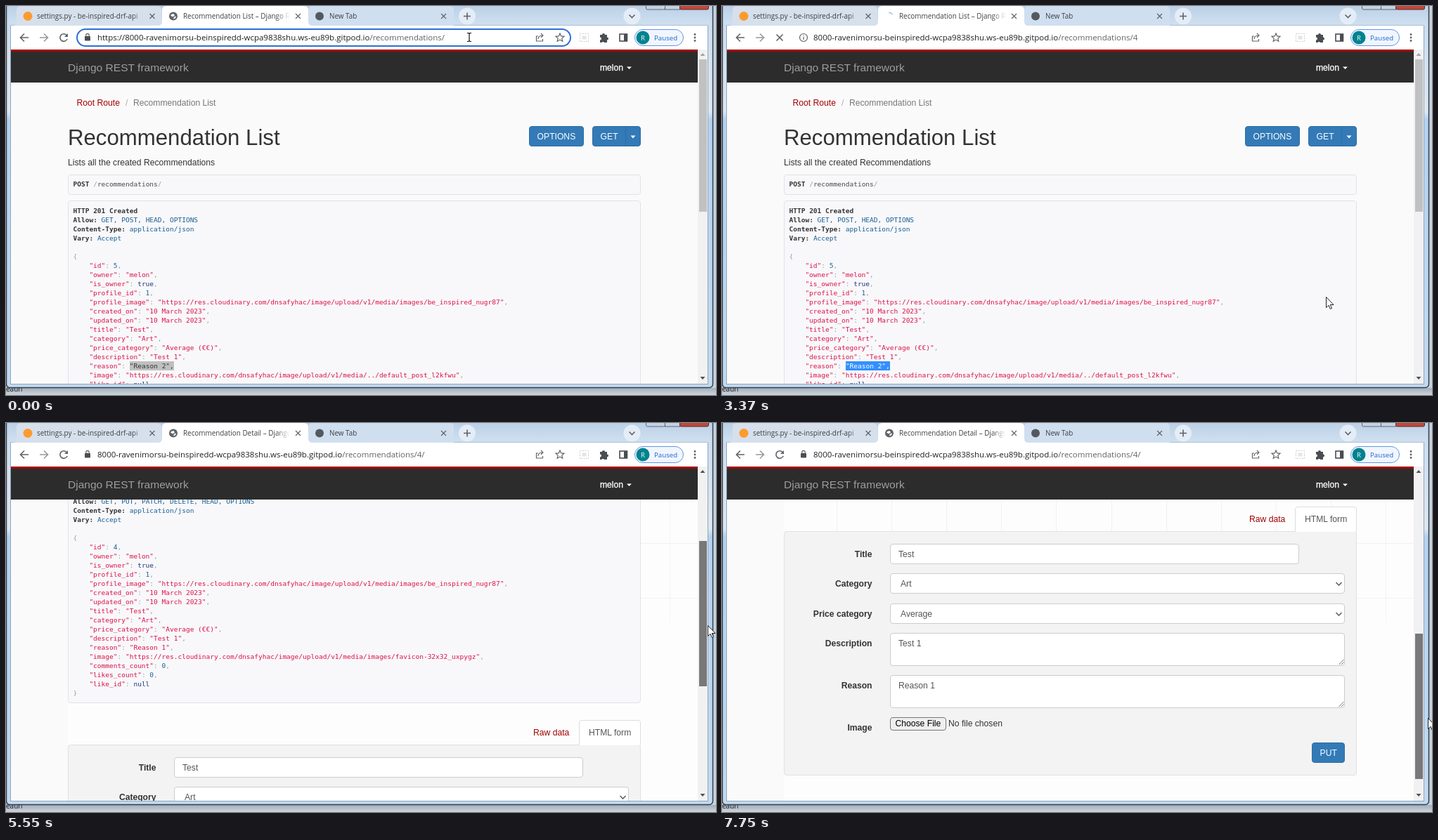
Recreate the animation shown at these times as an HTML page. Size 1010 by 554 pixels, loop 8000 ms.

```html
<!DOCTYPE html>
<html lang="en">
<head>
<meta charset="utf-8">
<style>
  html, body { margin: 0; width: 1010px; height: 554px; overflow: hidden; }
  svg { display: block; }
  text { font: 12.15px "Liberation Sans", Arial, sans-serif; fill: #333; }
  .ui { font: 11.5px "Open Sans", sans-serif; fill: #202124; }
  .tab { font-size: 9.9px; fill: #3c4043; }
  .mono { font: 9.53px "DejaVu Sans Mono", monospace; fill: #93a1a1; }
  .bold { font-weight: bold; fill: #333; }
  .str { fill: #d14; }
  .lit { fill: #195f91; }
  .kwd { fill: #1e347b; }
  .pln { fill: #48484c; }
  .red { fill: #a30000; }
  .mute { fill: #777; }
  .white { fill: #fff; }
  .h1 { font-size: 31.2px; }
  .field { fill: #fff; stroke: #ccc; }
  .value { fill: #555; }
  .icon { fill: none; stroke: #5f6368; stroke-width: 1.6; }
  .thin { stroke-width: 1.2; }
  #popup > rect:first-child { filter: drop-shadow(0 2px 3px #0005); }
</style>
</head>
<body>
<script>
const DURATION = 8000;
const HOST = '8000-ravenimorsu-beinspiredd-wcpa9838shu.ws-eu89b.gitpod.io';
const USER = 'melon';
const MEDIA = 'https://res.cloudinary.com/dnsafyhac/image/upload/v1/media/';
const LINE = 13.03;

const text = (x, y, s, cls = '', extra = '') => `<text x="${x}" y="${y}" class="${cls}" ${extra}>${s}</text>`;
const rect = (x, y, w, h, fill, extra = '') =>
  `<rect x="${x}" y="${y}" width="${w}" height="${h}" ${fill ? `fill="${fill}"` : ''} ${extra}/>`;
// Outlined box whose 1px border lies on whole pixels
const box = (x, y, w, h, fill, extra) => rect(x + .5, y + .5, w - 1, h - 1, fill, `rx="3.5" ${extra}`);
const path = (d, cls = 'icon', extra = '') => `<path d="${d}" class="${cls}" ${extra}/>`;
const circle = (x, y, r, extra) => `<circle cx="${x}" cy="${y}" r="${r}" ${extra}/>`;
const group = (id, content) => `<g id="${id}">${content}</g>`;
const span = (cls, s) => `<tspan class="${cls}">${s}</tspan>`;
const button = (x, y, w, label, fill = '#337ab7', stroke = '#2e6da4') =>
  box(x, y, w, 29, fill, `stroke="${stroke}"`) + text(x + 11.6, y + 19, label, 'white');
const panel = (y, h) => box(88, y, 815, h, '#f8f8fb', 'stroke="#e1e1e8"');

// Page content

const colorJson = s => s.replace(/("[^"]*")|(\d+)|(true|null)/g, (m, str, num) =>
  span(str ? 'str' : num ? 'lit' : 'kwd', m));

const record = (id, reason, image, rest) => [
  `"id": ${id},`, `"owner": "${USER}",`, '"is_owner": true,', '"profile_id": 1,',
  `"profile_image": "${MEDIA}images/be_inspired_nugr87",`,
  '"created_on": "10 March 2023",', '"updated_on": "10 March 2023",',
  '"title": "Test",', '"category": "Art",', '"price_category": "Average (€€)",',
  '"description": "Test 1",', `"reason": "${reason}",`, `"image": "${MEDIA}${image}",`, ...rest];

function exchange(y, height, method, url, status, allow, json) {
  const header = (name, value) => span('bold', name + ':') + ' ' + span('lit', value);
  const head = [span('bold', status), header('Allow', allow),
    header('Content-Type', 'application/json'), header('Vary', 'Accept'), '', '{'];
  const row = (i, x, s) => text(x, Math.round(y + 54.6 + i * LINE), s, 'mono');
  return panel(y, 29) + panel(y + 37, height) +
    text(95.5, y + 17, span('bold', method) + ' ' + url.replace(/\w+/g, w => span('pln', w)), 'mono') +
    head.map((s, i) => row(i, 95.5, s)).join('') +
    json.map((s, i) => row(i + 6, 118.4, colorJson(s))).join('') +
    row(json.length + 6, 95.5, '}');
}

const heading = (title, ...lines) =>
  text(100.5, 142, 'Root Route', 'red') + text(170, 142, '/', 'mute', 'opacity=".6"') +
  text(88, 198, title, 'h1') +
  lines.map((s, i) => text(88, 227 + i * 17, s)).join('') +
  button(744, 171, 78, 'OPTIONS') + button(834, 171, 69, 'GET') +
  path('M881.5 171V200', '', 'stroke="#2e6da4"') + path('M888.5 184.5h7l-3.5 4z', 'white');

const listPage = heading('Recommendation List', 'Lists all the created Recommendations') +
  text(181, 142, 'Recommendation List', 'mute') +
  exchange(240, 300, 'POST', '/recommendations/', 'HTTP 201 Created', 'GET, POST, HEAD, OPTIONS',
    record(5, 'Reason 2', '../default_post_l2kfwu', ['"like_id": null,'])) +
  rect(176, 506, 63, 13, '', 'id="mark"') +
  text(175.8, 516, '"Reason 2",', 'mono', 'id="marked"');

const label = (y, s) => text(213.5, y, s, 'bold', 'text-anchor="end"');
const field = (y, w, h, name, value, x = 251) => label(y + 19, name) +
  box(239, y, w, h, '', 'class="field"') + text(x, y + 19, value, 'value');
const select = (y, name, value) => field(y, 647, 29, name, value, 254) + path(`M873.5 ${y + 13}l4 4 4-4`);
const area = (y, name, value) => field(y, 647, 47, name, value) +
  path(`M877.5 ${y + 45}l7-7m-3.5 7l3.5-3.5`, 'icon', 'style="stroke-width:.9"');

const form = box(88, 669, 815, 348, '#f3f3f4', 'stroke="#e1e1e4"') +
  path('M815.5 670V638q0-3.5 3.5-3.5H899q3.5 0 3.5 3.5V670', '', 'fill="#fff" stroke="#ddd"') +
  text(750, 656, 'Raw data', 'red') + text(829, 656, 'HTML form', 'value') +
  field(687, 582, 29, 'Title', 'Test') +
  select(729, 'Category', 'Art') + select(772, 'Price category', 'Average') +
  area(814, 'Description', 'Test 1') + area(874, 'Reason', 'Reason 1') +
  label(953, 'Image') + box(239, 934, 80, 19, '#efefef', 'stroke="#767676"') +
  text(246.5, 947, 'Choose File', '', 'style="fill:#000"') + text(322, 947, 'No file chosen') +
  button(839, 970, 47, 'PUT');

const detailPage = heading('Recommendation Detail', 'Displays details of selected Recommendation',
    'Allows the owner to edit or delete it') +
  text(181, 142, 'Recommendation List', 'red') + text(306, 142, '/', 'mute', 'opacity=".6"') +
  text(317, 142, 'Recommendation Detail', 'mute') +
  button(663, 171, 70, 'DELETE', '#d9534f', '#d43f3a') +
  exchange(258, 315, 'GET', '/recommendations/4/', 'HTTP 200 OK', 'GET, PUT, PATCH, DELETE, HEAD, OPTIONS',
    record(4, 'Reason 1', 'images/favicon-32x32_uxpygz', ['"comments_count": 0,', '"likes_count": 0,', '"like_id": null'])) +
  form;

let gridLines = 'M88 171.5H984M88 249.5H984';
for (let i = 0; i < 11; i++) gridLines += `M${Math.round(163 + 78.1 * i) + .5} 109V284`;
const grid = rect(88, 109, 896, 429, '#fdfdfd') + path(gridLines, '', 'stroke="#f2f2f2" fill="none"') +
  rect(88, 122, 815, 31, '#f4f4f4', 'id="crumbBar"');

// Browser window

const closeMark = x => path(`M${x - 3.5} 11l7 7m0-7l-7 7`, 'icon thin');
const globe = (x, y) => circle(x, y, 6, 'fill="#5f6368"') +
  path(`M${x - 4} ${y - 1}q2-3 5-2l1 2-3 2zm5 2l3-1-1 3-3 1z`, 'white');

const frame = rect(0, 0, 1010, 554, '#c6d2de') + rect(0, 544, 1010, 10, 'url(#shade)') +
  text(0, 549, 'eaun', 'ui', 'style="font-size:10px"') +
  rect(.5, -10, 1005, 553.5, 'url(#glass)', 'rx="5" stroke="#34404e" stroke-width="1.5"') +
  rect(6.5, 28, 992, 510.5, '#fafafa', 'stroke="#8ea6bd"') +
  rect(910.5, -6, 27, 11, '#c3d3e4', 'rx="2" stroke="#5a6878"') + rect(937.5, -6, 21, 11, '#c3d3e4', 'stroke="#5a6878"') +
  rect(958.5, -6, 41, 11, '#c0483a', 'rx="2" stroke="#5a2f2c"');

const tabs = path('M10 28q5 0 5-6V6q0-6 6-6H215q6 0 6 6V28z', '', 'fill="#d6e0ec"') +
  path('M430 28V6q0-6 6-6H631q6 0 6 6V28z', '', 'fill="#d0dff0"') +
  path('M216 28q6 0 6-6V6q0-6 6-6H424q6 0 6 6V22q0 6 6 6z', 'white') +
  circle(31, 14.5, 6.5, 'fill="#ff9a2e"') + circle(446, 14.5, 6, 'fill="#55595e"') +
  text(44, 18, 'settings.py - be-inspired-drf-api', 'ui tab') +
  text(252, 18, '', 'ui tab', 'id="title"') + text(460, 18, 'New Tab', 'ui tab') +
  rect(180, 5, 22, 20, 'url(#fadeTab)') + rect(385, 5, 21, 20, 'url(#fadeActive)') + rect(405, 5, 5, 20, '#fff') +
  [208, 415.5, 622.5].map(closeMark).join('') +
  group('favicon', globe(238, 14.5)) +
  circle(238, 14.5, 5, 'id="spinner" fill="none" stroke="#a9c3e8" stroke-width="1.6" stroke-dasharray="6 26"') +
  circle(656, 14.5, 12, 'fill="#e4edf7"') + path('M651 14.5h10m-5-5v10') +
  circle(890.5, 14.5, 12, 'fill="#e4edf7"') + path('M886.5 12.5l4 4 4-4');

const toolbar = rect(7, 28, 991, 34, '#fff') +
  path('M32 45H21m5-5.5l-5.5 5.5 5.5 5.5') + path('M48 45h11m-5-5.5l5.5 5.5-5.5 5.5', 'icon', 'opacity=".65"') +
  group('reload', path('M86.5 42a5.3 5.3 0 1 0 .6 5') + path('M88 39v5h-5z', '', 'fill="#5f6368"')) +
  group('stop', path('M77.5 40.5l9 9m0-9l-9 9')) +
  rect(101, 33, 702, 24, '#fff', 'id="focus" rx="12" stroke="#2c6fd6" stroke-width="2"') +
  path('M757 43h-2.5v7h9v-3M757 47q.5-5 6-5m-2-3l3 3-3 3', 'icon thin') +
  path('M788 39l1.7 3.9 4.3.4-3.2 2.8 1 4.2-3.8-2.2-3.8 2.2 1-4.2-3.2-2.8 4.3-.4z', 'icon thin') +
  rect(816.5, 39.5, 12, 11, 'none', 'stroke="#ccc" stroke-dasharray="2 1.5"') + rect(819.5, 42.5, 6, 5, '#e4e4e4') +
  path('M845 41h3a2 2 0 1 1 4 0h3v3.5a2 2 0 1 1 0 4V52h-4a2 2 0 0 0-3.5 0H845v-3.5a2 2 0 0 0 0-4z', '', 'fill="#4a4d51"') +
  rect(873, 40, 10.5, 10, 'none', 'stroke="#4a4d51" stroke-width="1.6"') + rect(879, 40, 4.5, 10, '#4a4d51') +
  rect(894.5, 33.5, 69, 23, '#f1f6fe', 'rx="11.5" stroke="#5f96e8"') +
  circle(906, 45, 9.5, 'fill="#00838f"') + text(906, 48.5, 'R', 'ui', 'text-anchor="middle" style="font-size:9.5px;fill:#fff"') +
  text(922, 48.5, 'Paused', 'ui', 'style="font-size:9.7px;fill:#1a67d2"') +
  [40.5, 45, 49.5].map(y => circle(980, y, 1.4, 'fill="#5f6368"')).join('');

const navbar = rect(7, 62, 977, 3, '#a30000') + rect(7, 65, 977, 44, '#2c2c2c') +
  text(88, 93, 'Django REST framework', '', 'style="font-size:15.55px;fill:#9d9d9d"') +
  text(845, 92, USER, 'white', 'stroke="#fff" stroke-width=".3"') + path('M883 86.5h7l-3.5 3.5z', 'white');

const scrollbar = rect(984, 62, 14, 476, '#f1f1f1') + rect(986, 76, 11, 217, '', 'id="thumb"') +
  path('M987.5 71h7l-3.5-4z', '', 'id="up"') + path('M987.5 528h7l-3.5 4z', '', 'fill="#505050"');

const popup = rect(92, 29, 720, 112, '#fff', 'rx="13"') + rect(92, 66, 720, 34, '#e8eaed') +
  globe(122, 83) + text(138, 87, `https://${HOST}/recommendations/4`, 'ui') +
  circle(121, 116, 4, 'class="icon"') + path('M124 119l4 4') +
  text(138, 121, `https://${HOST}/recommendations/`, 'ui') + globe(122, 45);

const address = group('lock', rect(112, 43, 8, 6.5, '#4a4d51', 'rx="1"') + path('M113.8 43v-1.5a2.2 2.2 0 0 1 4.4 0V43', 'icon thin')) +
  group('info', circle(116, 45, 5.5, 'class="icon thin"') + path('M116 44v4m0-6.5v1.2', 'icon thin')) +
  text(130, 49, '', 'ui', 'id="url"') + rect(625, 36, 1, 16, '#000', 'id="caret"');

document.body.innerHTML = `<svg width="1010" height="554">
  <defs>
    <linearGradient id="glass" x2="0" y2="1">
      <stop stop-color="#b4cae3"/><stop offset=".06" stop-color="#cddeef"/>
      <stop offset=".29" stop-color="#dfe7f0"/><stop offset=".31" stop-color="#b4d2f0"/><stop offset="1" stop-color="#c3daf0"/>
    </linearGradient>
    <linearGradient id="shade" x2="0" y2="1"><stop stop-color="#a3aeb9"/><stop offset="1" stop-color="#cdd6df"/></linearGradient>
    <linearGradient id="fadeTab"><stop stop-color="#d6e0ec" stop-opacity="0"/><stop offset=".8" stop-color="#d6e0ec"/></linearGradient>
    <linearGradient id="fadeActive"><stop stop-color="#fff" stop-opacity="0"/><stop offset=".9" stop-color="#fff"/></linearGradient>
    <clipPath id="refreshed"><rect id="refreshedBox" y="109"/></clipPath>
  </defs>
  ${frame}${tabs}${toolbar}
  <svg x="7" y="109" width="977" height="429" viewBox="7 109 977 429">
    <g id="grid" clip-path="url(#refreshed)">${grid}</g>
    ${group('list', listPage)}${group('detail', detailPage)}
  </svg>
  ${navbar}${scrollbar}${group('popup', popup)}${address}
  ${path('M0 0V15L3.5 11.8 5.8 17 8 16 5.7 11H10.5Z', '', 'id="arrow" fill="#fff" stroke="#222"')}
  ${path('M656 38.5h2l1 1 1-1h2M659 39.5V49.5M656 50.5h2l1-1 1 1h2', 'icon thin', 'id="beam" style="stroke:#111"')}
</svg>`;

// Animation

const $ = id => document.getElementById(id);
const show = (id, on) => $(id).setAttribute('display', on ? 'inline' : 'none');
const set = (id, attrs) => Object.entries(attrs).forEach(([k, v]) => $(id).setAttribute(k, v));

// Pointer moves: start, end, number of steps, target x, target y
const MOVES = [
  [930, 1230, 5, 792, 336], [1410, 1580, 4, 885, 502], [1640, 1960, 6, 859, 414],
  [4380, 4560, 4, 949, 255], [4750, 4860, 3, 991, 196], [5290, 5550, 5, 998, 288],
  [5830, 6150, 5, 998, 359], [6240, 6240, 1, 998, 361],
  [6380, 6770, 6, 1004, 395], [7500, 7750, 4, 1004, 420.3]];

function pointer(t) {
  let x = 654, y = 40;
  for (const [start, end, steps, tx, ty] of MOVES) {
    if (t < start) break;
    const step = (end - start) / (steps - 1) || 1;
    const p = Math.min(1, (Math.floor((t - start) / step + 1e-6) + 1) / steps);
    x += (tx - x) * p;
    y += (ty - y) * p;
  }
  return { x: Math.round(x), y };
}

function draw(t) {
  const typing = t >= 2410 && t < 3260, loading = t >= 3260 && t < 3600;
  const focused = t < 3260, loaded = t >= 3600;
  const { x, y } = pointer(t);
  const drag = t >= 5230 ? y - 196 : 0;

  show('beam', t < 930);
  show('arrow', t >= 930);
  set('arrow', { transform: `translate(${x + .5} ${Math.round(y) + .5})` });

  show('list', !loaded);
  show('detail', loaded);
  set('detail', { transform: `translate(0 ${-Math.round(drag * 2.296)})` });
  show('grid', drag > 0 || (t >= 990 && t < 3260));
  show('crumbBar', !loaded);
  set('refreshedBox', loaded ? { x: 88, width: 896, height: 429 }
    : { x: 625, width: t < 1410 ? 177 : 231, height: t < 1410 ? 244 : 349 });
  set('mark', { fill: focused ? '#c0c0c0' : '#3390ff' });
  $('marked').style.fill = focused ? '#323232' : '#fff';

  set('thumb', { y: 76 + Math.round(drag), height: loaded ? 207 : 217,
    fill: t >= 5230 ? '#787878' : t >= 4860 ? '#a8a8a8' : '#c1c1c1' });
  set('up', { fill: drag > 0 ? '#505050' : '#a3a3a3' });

  show('focus', focused && !typing);
  show('popup', typing);
  show('lock', !typing && !loading);
  show('info', loading);
  show('reload', !loading);
  show('stop', loading);
  show('favicon', !loading);
  show('spinner', loading);
  set('spinner', { transform: `rotate(${-100 - (t - 3370) * .3} 238 14.5)` });
  $('title').textContent = `Recommendation ${loaded ? 'Detail' : 'List'} – Django R`.slice(0, 30);

  const tail = loaded ? '4/' : t >= 2410 ? '4' : '';
  $('url').innerHTML = (focused ? 'https://' : '') + HOST +
    `<tspan fill="#5f6368">/recommendations/${tail}</tspan>`;
  set('url', { x: typing ? 138 : 130 });
  const blinkOn = typing ? t < 2950 : Math.floor((t - 370) / 530) % 2 === 0;
  show('caret', focused && t >= 370 && blinkOn);
  set('caret', { x: typing ? 641 : 625 });
}

function tick(now) {
  draw(now % DURATION);
  requestAnimationFrame(tick);
}
draw(0);
requestAnimationFrame(tick);
</script>
</body>
</html>
```
